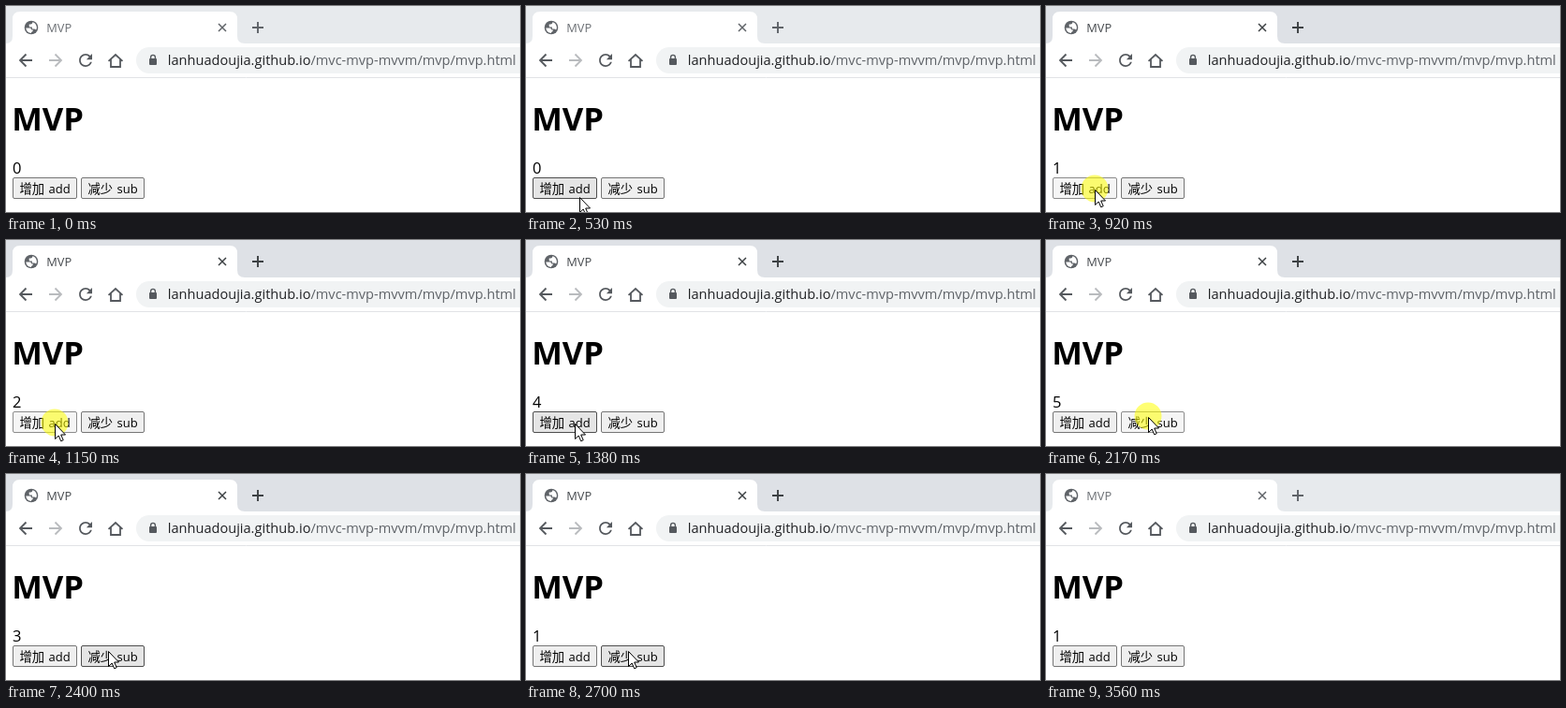
Animation of 549x220 px, one loop 3640 ms. Source, as an HTML page:

```html
<!DOCTYPE html>
<html lang="zh">
<head>
<meta charset="utf-8">
<title>MVP</title>
<style>
  html, body { margin: 0; width: 100%; height: 100%; overflow: hidden; background: #fff; }
  svg { display: block; font-family: "Open Sans", "Noto Sans", sans-serif; }
  .cjk { font: 13.3px "Noto Sans CJK SC", "Noto Sans CJK", sans-serif; }
  .button { font-size: 13px; }
  .button rect { fill: #efefef; stroke: #767676; }
  .button.hover rect { fill: #e5e5e5; stroke: #4f4f4f; }
  .button.down rect { fill: #f5f5f5; stroke: #8d8d8d; }
  #strip { fill: #e7eaed; }
  #title { fill: #6b6f74; }
  #tools { stroke: #5f6368; }
  .active #strip { fill: #dee1e6; }
  .active #title { fill: #45494d; }
  .active #tools { stroke: #3c4043; }
</style>
</head>
<body>
<svg id="stage" width="549" height="220" viewBox="0 0 549 220">
  <rect width="549" height="220" fill="#fff"/>

  <!-- tab strip -->
  <rect id="strip" width="549" height="40"/>
  <path d="M0 40Q7 40 7 32V14Q7 6 15 6H239Q247 6 247 14V32Q247 40 255 40Z" fill="#fff"/>
  <circle cx="27" cy="23" r="7.3" fill="#5f6368"/>
  <path d="M21.2 23.6h4q2 .2 2 2h1.6q.5 2-1.8 2.3v1.2q-4.8-.2-5.8-5.5zM28.5 17.2q-.3 2-1.8 2.2h-2v2q0 1.2 1.6 1.2h1.6v1.8h2q1.6 0 2.1 1.2 .7-1 .9-2.6-.5-4.5-4.4-5.8z" fill="#fff"/>
  <text id="title" x="43.3" y="28" font-size="12.8">MVP</text>
  <g id="tools" fill="none">
    <path d="M227 19l8 8m0-8l-8 8" stroke-width="1.5"/>
    <path d="M263 23h12M269 17v12" stroke-width="1.9"/>
  </g>

  <!-- toolbar -->
  <path d="M0 76.5H549" stroke="#e1e3e6"/>
  <rect x="139" y="44" width="430" height="28" rx="14" fill="#f1f3f4"/>
  <g fill="none" stroke="#55595e" stroke-width="1.8">
    <path d="M28 58H15.5M21.5 51.5L15 58l6.5 6.5"/>
    <path d="M46 58H58.5M52.5 51.5L59 58l-6.5 6.5" stroke="#b9bbbe"/>
    <path d="M109.5 58.8L117 52l7.5 6.8M112 57V65H122V57"/>
    <path d="M154.6 56.5V54.8a2.4 2.4 0 0 1 4.8 0V56.5" stroke-width="1.4"/>
  </g>
  <path transform="translate(74.6 47.6) scale(.87)" fill="#55595e" d="M17.65 6.35C16.2 4.9 14.21 4 12 4c-4.42 0-7.99 3.58-7.99 8s3.57 8 7.99 8c3.73 0 6.84-2.55 7.73-6h-2.08c-.82 2.33-3.04 4-5.65 4-3.31 0-6-2.69-6-6s2.69-6 6-6c1.66 0 3.14.69 4.22 1.78L13 11h7V4l-2.35 2.35z"/>
  <rect x="153" y="56" width="8" height="7" rx="1" fill="#55595e"/>
  <text x="172.8" y="63" font-size="14.57" fill="#202124">lanhuadoujia.github.io<tspan fill="#5f6368">/mvc-mvp-mvvm/mvp/mvp.html</tspan></text>

  <!-- page -->
  <text x="6.2" y="132.5" font-size="34.6" font-weight="700">MVP</text>
  <text id="count" x="7" y="179" font-size="16.5">0</text>
  <g id="add" class="button">
    <rect x="7.5" y="183.5" width="68" height="22" rx="1.5"/>
    <text class="cjk" x="14.5" y="200">增加</text>
    <text x="45.5" y="200">add</text>
  </g>
  <g id="sub" class="button">
    <rect x="80.5" y="183.5" width="67" height="22" rx="1.5"/>
    <text class="cjk" x="87.5" y="200">减少</text>
    <text x="118.5" y="200">sub</text>
  </g>

  <g id="pointer">
    <circle id="glow" cy="-1" r="14.5" fill="#ff0" opacity=".55"/>
    <path d="M.5 .5V16.5L4.2 13L6.7 18.8L9.2 17.7L6.7 12H11.5Z" fill="#fff" stroke="#000"/>
  </g>
</svg>
<script>
const LOOP = 3640, TICK = 76.7, ENTER = 70;
const $ = id => document.getElementById(id);

// the mouse button flips between down and up at these times
const addFlips = [770, 850, 920, 1070, 1150, 1220, 1300, 1380, 1680, 1850];
const subFlips = Array.from({ length: 8 }, (_, i) => 2170 + 75.7 * i);

// stepped move: x eases out, y eases in
function glide(t, start, steps, [x0, y0], [x1, y1]) {
  const step = Math.floor((t - start + 3) / TICK);
  const u = Math.min(Math.max(step / steps, 0), 1);
  return [
    Math.round(x0 + (x1 - x0) * (1 - (1 - u) ** 2.5)),
    Math.round(y0 + (y1 - y0) * u * u)
  ];
}

function pointerAt(t) {
  if (t < ENTER) return [213, 230];
  let p = glide(t, ENTER, 8, [213, 214], [52, 196]);
  p = glide(t, 1770, 3, p, [109, 189]);
  return glide(t, 2940, 2, p, [160, 230]);
}

function draw(now) {
  const t = now % LOOP;
  const passed = flips => flips.filter(f => f <= t).length;
  const adds = passed(addFlips), subs = passed(subFlips);
  const down = (adds + subs) % 2 === 1;
  const [x, y] = pointerAt(t);

  const mark = (id, left, right) => {
    const hover = x >= left && x < right && y >= 183 && y < 206;
    $(id).classList.toggle("hover", hover);
    $(id).classList.toggle("down", hover && down);
  };
  mark("add", 7, 76);
  mark("sub", 80, 148);

  $("count").textContent = (adds >> 1) - (subs >> 1);
  $("stage").classList.toggle("active", t >= addFlips[0] && t < 3560);
  $("pointer").setAttribute("transform", `translate(${x} ${y})`);
  $("glow").setAttribute("visibility", down ? "visible" : "hidden");
  requestAnimationFrame(draw);
}
draw(performance.now());
</script>
</body>
</html>
```
